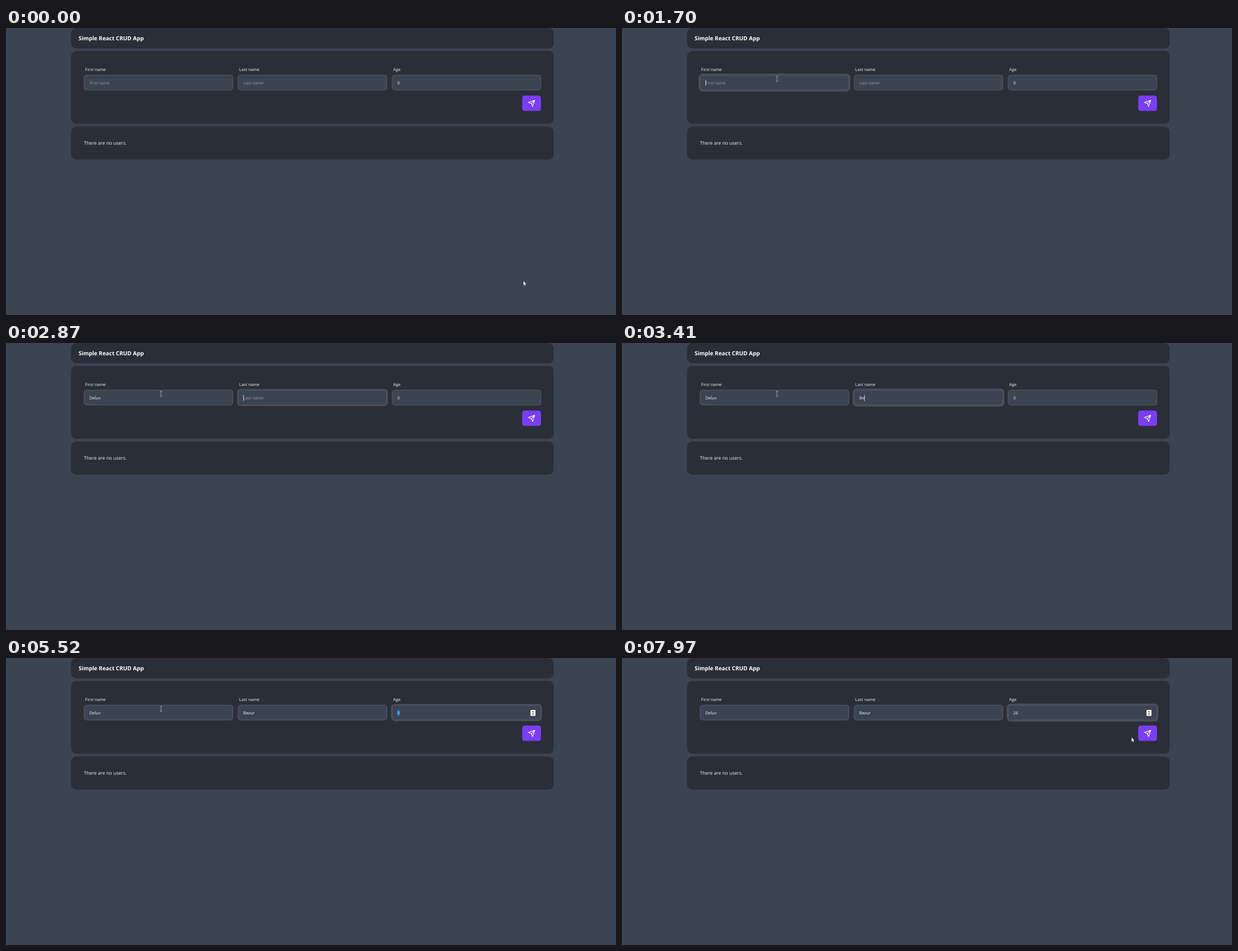
Recreate the animation shown at these times as an HTML page. Size 1090 by 514 pixels, loop 8000 ms.

```html
<!DOCTYPE html>
<html lang="en">
<head>
<meta charset="utf-8">
<title>Simple React CRUD App</title>
<style>
  html, body { margin: 0; width: 100%; height: 100%; overflow: hidden; background: #3d4451; }
  svg { display: block; width: 1090px; height: 514px; }
  text {
    font: 7.45px "Open Sans", "Noto Sans", sans-serif;
    fill: #f4f5f7;
    text-rendering: geometricPrecision;
    white-space: pre;
  }
  .title { font-size: 9.97px; font-weight: 700; fill: #fff; }
  .body { font-size: 8.5px; }
  .card { fill: #2a2e37; }
  .input { fill: #3d4451; stroke: #60656f; stroke-width: .8; }
</style>
</head>
<body>
<svg id="stage" viewBox="0 0 1090 514"></svg>
<script>
const LOOP = 8000;
const stage = document.getElementById('stage');

function add(parent, tag, attrs = {}, text = '') {
  const el = document.createElementNS('http://www.w3.org/2000/svg', tag);
  set(el, attrs);
  el.textContent = text;
  parent.appendChild(el);
  return el;
}
function set(el, attrs) {
  for (const key in attrs) el.setAttribute(key, attrs[key]);
}
function show(el, visible) {
  el.setAttribute('visibility', visible ? 'visible' : 'hidden');
}
const within = (t, [from, to]) => t >= from && t < to;
const smooth = p => p * p * (3 - 2 * p);
const mix = (a, b, p) => a + (b - a) * p;

// Page
add(stage, 'rect', { y: 510, width: 1090, height: 4, fill: '#3b414d' });
for (const [y, height] of [[0, 36.4], [40.9, 130.6], [176.2, 59.5]])
  add(stage, 'rect', { class: 'card', x: 116.4, y, width: 862.2, height, rx: 9.15 });
add(stage, 'text', { class: 'title', x: 129.7, y: 21.9 }, 'Simple React CRUD App');
add(stage, 'text', { class: 'body', x: 139.2, y: 209.4 }, 'There are no users.');

// Form fields; keys hold the times at which each character appears
const BOX = { y: 84, w: 266.4, h: 27.4, r: 4.6 };
const fields = [
  { label: 'First name', hint: 'First name', value: 'Deluv', keys: [1850, 2020, 2170, 2320, 2490],
    focus: [680, 2820], grow: 630 },
  { label: 'Last name', hint: 'Last name', value: 'Bezur', keys: [3180, 3410, 3960, 4190, 4890],
    focus: [2820, 5430], grow: 2820 },
  { label: 'Age', initial: '0', value: '26', keys: [6910, 7140],
    focus: [5430, LOOP], grow: 5450 }
];
const caretOff = [[1150, 1700], [4740, 4890], [5430, 6910], [7600, LOOP]];

fields.forEach((f, i) => {
  f.x = 139.3 + i * 275.2;
  f.outer = add(stage, 'rect', { fill: '#51545c' });
  f.inner = add(stage, 'rect', { fill: '#3d4451' });
  add(stage, 'rect', { class: 'input', x: f.x + .35, y: BOX.y + .35,
    width: BOX.w - .7, height: BOX.h - .7, rx: BOX.r - .35 });
  add(stage, 'text', { x: f.x + 2.3, y: 76.8 }, f.label);
  f.text = add(stage, 'text', { x: f.x + 9.6, y: 101.4 });
});

const selection = add(stage, 'rect', { x: fields[2].x + 9.6, y: 93, width: 4.4, height: 11, fill: '#0b71c4' });
stage.insertBefore(selection, fields[2].text);
const caret = add(stage, 'rect', { y: 93.2, width: .8, height: 10.6, fill: '#ebecf0' });

const spinner = add(stage, 'g');
add(spinner, 'rect', { x: 937.3, y: 93, width: 8.8, height: 10.6, fill: '#fff' });
add(spinner, 'path', { d: 'M939.6 97.2L941.7 94.9L943.8 97.2ZM939.6 99.4L941.7 101.7L943.8 99.4Z', fill: '#41454d' });

// Send button
add(stage, 'rect', { x: 922.4, y: 121, width: 33.6, height: 27.6, rx: 4.6, fill: '#793ef9' });
add(stage, 'path', {
  d: 'M22 2L11 13M22 2L15 22L11 13L2 9Z', transform: 'translate(932.3 128.1) scale(.5716)',
  fill: 'none', stroke: '#fff', 'stroke-width': 2, 'stroke-linecap': 'round', 'stroke-linejoin': 'round'
});

// Pointer
const click = add(stage, 'circle', { cx: 276, cy: 90.6, r: 7, fill: '#a9a32b' });
const arrow = add(stage, 'path', {
  d: 'M.3 .4V9.4L2.3 7.6L3.7 10.8L5.1 10.2L3.7 7.1H6.2Z',
  fill: '#fff', stroke: '#15171b', 'stroke-width': .55
});
const beam = add(stage, 'path', {
  d: 'M-2 -4.6H-.5L0 -4.2L.5 -4.6H2M0 -4.2V4.2M-2 4.6H-.5L0 4.2L.5 4.6H2',
  fill: 'none', stroke: '#b9bbbf', 'stroke-width': .8
});

function pointerAt(t) {
  const step = (start, gap, count) =>
    Math.max(0, Math.min(1, (Math.floor((t - start) / gap) + 1) / count));
  const arrive = smooth(step(70, 74, 7));
  const leave = smooth(step(7600, 74, 6));
  if (leave > 0)
    return [mix(277, 910, leave), mix(91, 141, leave) + 28 * Math.sin(Math.PI * leave)];
  return [mix(924, 277, arrive), mix(452, 91, arrive)];
}

function drawRing(el, f, spread) {
  set(el, { x: f.x - spread, y: BOX.y - spread, width: BOX.w + 2 * spread,
    height: BOX.h + 2 * spread, rx: BOX.r + spread });
}

function drawField(f, t) {
  const focused = within(t, f.focus);
  const typed = f.value.slice(0, f.keys.filter(key => t >= key).length);
  f.text.textContent = typed || f.initial || f.hint;
  f.text.style.fill = typed || f.initial ? '' : '#969eaa';

  const age = t - f.grow;
  const growth = age < 50 ? .2 : age < 130 ? .6 : 1;
  drawRing(f.outer, f, 2.3 * growth);
  drawRing(f.inner, f, 1.15 * growth);
  show(f.outer, focused);
  show(f.inner, focused);

  if (focused) {
    const width = typed ? f.text.getComputedTextLength() : 0;
    set(caret, { x: f.x + 9.7 + width });
  }
}

function draw(t) {
  fields.forEach(f => drawField(f, t));
  show(caret, t >= 680 && !caretOff.some(span => within(t, span)));
  show(selection, within(t, [5430, 6910]));
  show(spinner, t >= 5430);
  show(click, within(t, [588, 680]));

  const [x, y] = pointerAt(t);
  const overInput = y > BOX.y && y < BOX.y + BOX.h &&
    fields.some(f => x > f.x && x < f.x + BOX.w);
  show(beam, overInput);
  show(arrow, !overInput);
  set(overInput ? beam : arrow, { transform: `translate(${x} ${y})` });
}

const start = performance.now();
function tick() {
  draw((performance.now() - start) % LOOP);
  requestAnimationFrame(tick);
}
tick();
</script>
</body>
</html>
```
